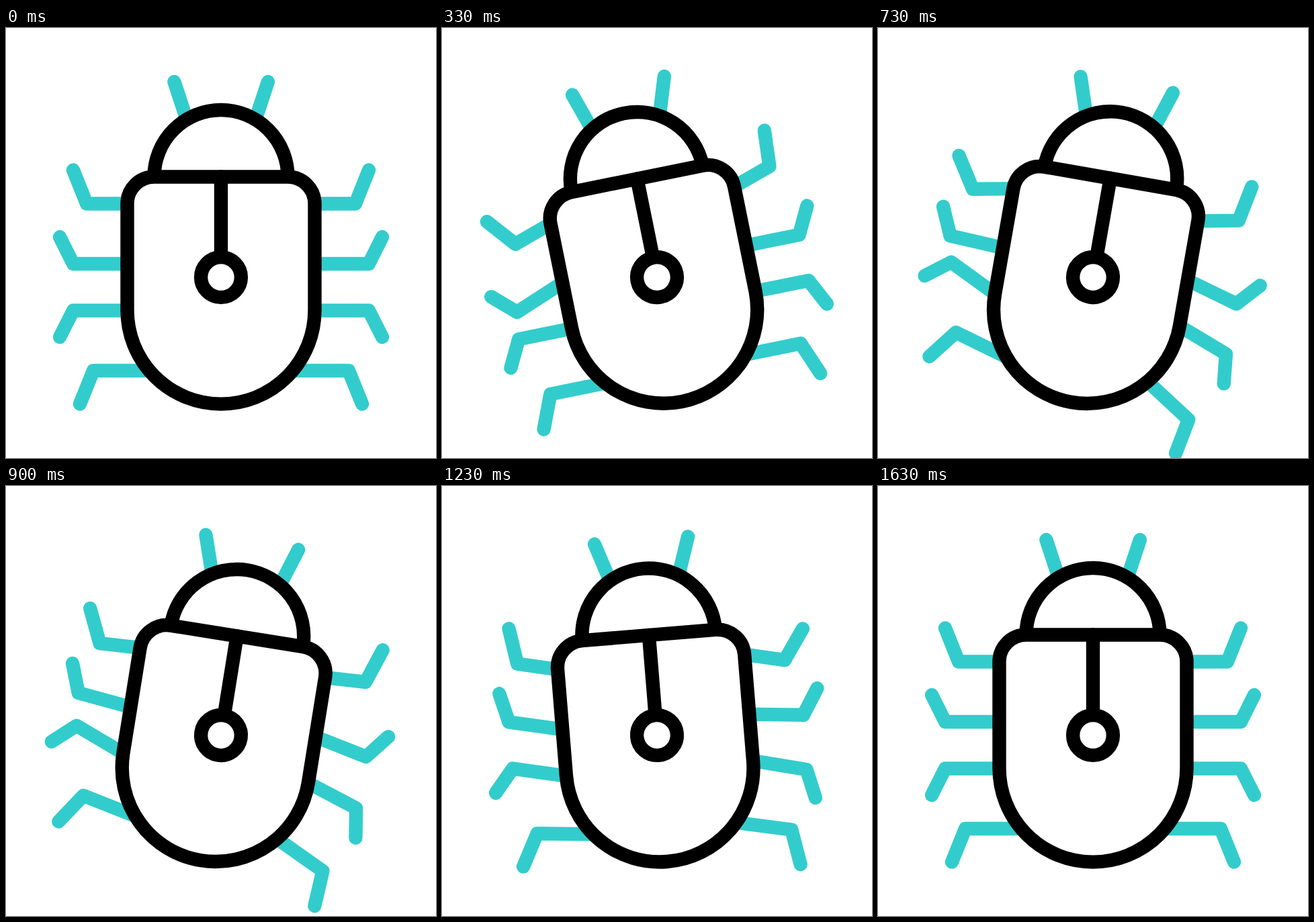
An HTML page that plays this animation: 640 by 640 pixels, repeating every 1670 ms.

```html
<!DOCTYPE html>
<html lang="en">
<head>
<meta charset="utf-8">
<title>Wriggling mouse bug</title>
<style>
  html, body { margin: 0; height: 100%; overflow: hidden; background: #fff; }
  svg { display: block; width: 100vw; height: 100vh; }
</style>
</head>
<body>
<svg viewBox="0 0 640 640" fill="none" stroke="#000" stroke-width="20.4" stroke-linecap="round" stroke-linejoin="round">
  <g id="bug">
    <g id="limbs" stroke="#33cccc">
      <path d="M250.4 80L266.5 129M389.9 80L373.7 129"/>
    </g>
    <g fill="#fff">
      <path d="M220.5 221.5a99.5 99.5 0 0 1 199 0"/>
      <path d="M220.5 221.5h199a40 40 0 0 1 40 40V420.2a139.5 139.5 0 0 1 -279 0V261.5a40 40 0 0 1 40 -40z"/>
      <path d="M320 221.5V341"/>
      <circle cx="320" cy="371" r="29.9"/>
    </g>
  </g>
</svg>
<script>
const FRAME_MS = 1000 / 30, LOOP_MS = 1670, LAST_FRAME = 49;
const BEAT = 6, LAST_KICK = 22, SETTLE = 41, FLICK = 45;

// Body tilt as [frame, degrees].
const tiltKeys = [[0, 0], [11.5, -12], [12.5, -12], [24.1, 12], [35.2, -5], [46.4, 0]];

const linear = p => p;
const smooth = p => p * p * (3 - 2 * p);

function valueAt(keys, frame, ease) {
  const next = keys.findIndex(([time]) => time > frame);
  if (next < 0) return keys[keys.length - 1][1];
  const [t0, v0] = keys[next - 1], [t1, v1] = keys[next];
  return v0 + (v1 - v0) * ease((frame - t0) / (t1 - t0));
}

// Kicks follow one another by a beat, then the leg settles, flicks once more and rests.
function swing(kicks, settled) {
  const first = LAST_KICK - BEAT * (kicks.length - 1);
  return [
    [0, 0], [first - BEAT, 0],
    ...kicks.map((angle, i) => [first + BEAT * i, angle]),
    [SETTLE, settled], [FLICK, Math.max(...kicks)], [LAST_FRAME, 0]
  ];
}

const bug = document.getElementById("bug");
const limbs = document.getElementById("limbs");
const swingers = [];

function addLeg(points, keys) {
  const node = document.createElementNS(limbs.namespaceURI, "polyline");
  node.setAttribute("points", points.join(" "));
  limbs.append(node);
  swingers.push({ node, hip: points[0], keys });
}

// The points are hip, knee and foot of the left leg.
function addPair(points, leftKeys, rightKeys) {
  addLeg(points, leftKeys);
  addLeg(points.map(([x, y]) => [640 - x, y]), rightKeys);
}

const reach = swing([-18.5, 37, -10.5], 19);
const step = swing([-16, 16], 2.5);
addPair([[180.5, 261.5], [120, 261.5], [100, 211.5]], reach, reach);
addPair([[180.5, 351], [100, 351], [80, 311]], swing([-21.5, 17, 3], 15), step);
addPair([[180.5, 420.5], [100, 420.5], [80, 460]], swing([-16, 26], 9), swing([-8, 21], 12));
addPair([[213, 510], [130, 510], [110, 559.5]], step, swing([-23.5, 33], 6.5));

function rotate(node, angle, [x, y]) {
  node.setAttribute("transform", `rotate(${angle} ${x} ${y})`);
}

function draw(time) {
  const frame = Math.min(LAST_FRAME, Math.floor((time % LOOP_MS + 5) / FRAME_MS));
  rotate(bug, valueAt(tiltKeys, frame, smooth), [320, 371]);
  for (const { node, hip, keys } of swingers) rotate(node, valueAt(keys, frame, linear), hip);
}

const start = performance.now();
function tick() {
  draw(performance.now() - start);
  requestAnimationFrame(tick);
}
tick();
</script>
</body>
</html>
```
